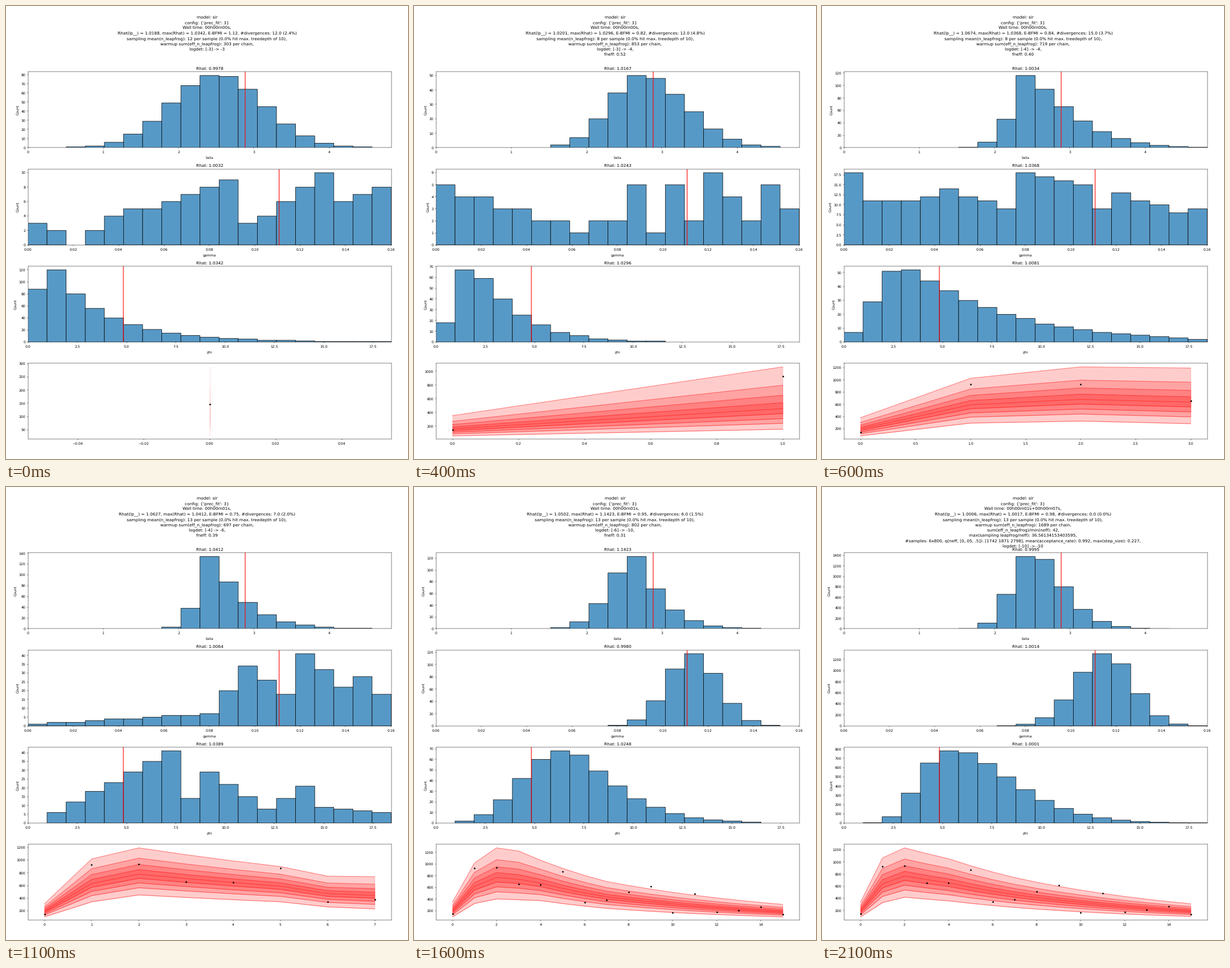
A matplotlib script for the animation above (2600 ms loop, 706 px wide and 794 px high).

```python
import numpy as np
import matplotlib.pyplot as plt
from matplotlib.animation import FuncAnimation

plt.rcParams["text.hinting"] = "no_hinting"

W, H, DPI = 706, 794, 44.125
BINS = np.arange(19)
BLUE = "#5799c6"
# name, axis end, true value
PARAMS = [("beta", 4.824, 2.885), ("gamma", 0.1601, 0.1107), ("phi", 18.42, 4.838)]
OBSERVED = [147, 929, 934, 658, 650, 873, 343, 380,
            516, 615, 166, 487, 175, 210, 265, 136]
# log-scale position of each quantile line between the lowest and the highest
LEVELS = [0, 0.23, 0.36, 0.47, 0.56, 0.65, 0.745, 0.85, 1]


def header(wall, lp, rhat, bfmi, div, leap, warmup, *rest):
    return [
        "model: sir",
        "config: {'prec_fit': 3}",
        f"Wall time: {wall},",
        f"Rhat(lp__) = {lp}, max(Rhat) = {rhat}, E-BFMI = {bfmi}, #divergences: {div}",
        f"sampling mean(n_leapfrog): {leap} per sample (0.0% hit max. treedepth of 10),",
        f"warmup sum(eff_n_leapfrog): {warmup} per chain,",
        *rest]


def bell(peak, mode, left, right, lpow=2, rpow=2):
    """Counts of a skewed bell whose sides fall off as exp(-distance ** power)."""
    d = BINS - mode
    drop = np.where(d < 0, np.abs(d / left) ** lpow, np.abs(d / right) ** rpow)
    y = np.exp(-drop)
    return np.round(peak * y / y.max())


def trace(*points):
    """Counts along a line through (bin, count) points."""
    return np.round(np.interp(BINS, *zip(*points)))


def curve(*points):
    """Exponential growth and decay between (time, value) points."""
    t, v = zip(*points)
    return np.exp(np.interp(np.arange(t[-1] + 1), t, np.log(v)))


# header lines, Rhat values, three histograms, lowest and highest quantile
STAGES = [
    (header("00h00m00s", "1.0188", "1.0342", "1.12", "12.0 (2.4%)", 12, 303,
            "logdet: [-3] -> -3"),
     ("0.9978", "1.0032", "1.0342"),
     (bell(79, 9.4, 3.4, 3.4),
      trace((0, 3), (2, 0), (4, 4), (7, 6), (10, 9), (11, 3), (13, 6),
            (15, 10), (16, 6), (18, 8)),
      bell(120, 1, 1.8, 2.7, 2, 0.9)),
     curve((0, 27.5)), curve((0, 288))),

    (header("00h00m00s", "1.0201", "1.0296", "0.82", "12.0 (4.8%)", 8, 853,
            "logdet: [-3] -> -4,", "fneff: 0.52"),
     ("1.0167", "1.0243", "1.0296"),
     (bell(50, 10.2, 2.3, 3.3),
      trace((0, 5), (7, 1), (9, 2), (10, 5), (11, 1), (12, 5), (13, 2),
            (14, 6), (16, 2), (17, 5), (18, 3)),
      bell(67, 1.3, 1.1, 2.6, 2, 1.2)),
     curve((0, 57), (1, 154)), curve((0, 354), (1, 1067))),

    (header("00h00m00s", "1.0674", "1.0368", "0.84", "15.0 (3.7%)", 8, 719,
            "logdet: [-4] -> -4,", "fneff: 0.40"),
     ("1.0034", "1.0368", "1.0081"),
     (bell(116, 9, 1.06, 3, 1.5, 1.4),
      trace((0, 18), (1, 11), (3, 11), (5, 14), (8, 9), (9, 18), (12, 15),
            (13, 9), (14, 13), (17, 8), (18, 9)),
      bell(52, 2.7, 2.05, 5.4, 2.5, 1.1)),
     curve((0, 85), (1, 294), (2, 327), (3, 285)),
     curve((0, 382), (1, 1028), (2, 1215), (3, 1196))),

    (header("00h00m01s", "1.0627", "1.0412", "0.75", "7.0 (2.0%)", 13, 697,
            "logdet: [-4] -> -6,", "fneff: 0.39"),
     ("1.0412", "1.0064", "1.0389"),
     (bell(134, 9, 0.86, 2, 1.6, 1.2),
      trace((0, 1), (9, 7), (11, 34), (13, 18), (14, 41), (16, 22), (17, 28), (18, 18)),
      trace((0, 0), (7, 41), (8, 14), (9, 29), (12, 8), (14, 21), (15, 9), (18, 6))),
     curve((0, 106), (1, 343), (2, 452), (5, 344), (6, 263), (7, 232)),
     curve((0, 313), (1, 1020), (2, 1195), (5, 900), (6, 749), (7, 740))),

    (header("00h00m01s", "1.0502", "1.1423", "0.95", "6.0 (1.5%)", 13, 802,
            "logdet: [-6] -> -10,", "fneff: 0.31"),
     ("1.1423", "0.9980", "1.0248"),
     (bell(123, 10, 1.95, 1.55, 2, 1.2),
      bell(118, 12.9, 1.85, 1.95),
      bell(68, 6.5, 3.3, 3.3, 2.5, 1.4)),
     curve((0, 98), (1, 325), (2, 403), (4, 375), (7, 242), (15, 97)),
     curve((0, 350), (1, 1017), (2, 1275), (3, 1222), (7, 700), (15, 310))),

    (header("00h00m01s+00h00m07s", "1.0006", "1.0017", "0.98", "0.0 (0.0%)", 13, 1689,
            "sum(eff_n_leapfrog)/min(neff): 42,",
            "max(sampling leapfrog/neff): 36.56134153403595,",
            "#samples: 6x800, q(neff, [0,.05, .5]): [1742 1871 2798], "
            "mean(acceptance_rate): 0.992, max(step_size): 0.227,",
            "logdet: [-10] -> -10"),
     ("0.9995", "1.0014", "1.0001"),
     (bell(1380, 9.5, 1.65, 2.05, 2.3, 1.6),
      bell(1305, 13.2, 2.17, 2),
      bell(780, 5.5, 2.6, 4.1, 3, 1.6)),
     curve((0, 97), (1, 331), (2, 421), (4, 360), (7, 252), (15, 104)),
     curve((0, 336), (1, 1068), (2, 1233), (4, 1054), (7, 744), (15, 313))),
]

fig = plt.figure(figsize=(W / DPI, (H + 0.001) / DPI), dpi=DPI, facecolor="white")
axes = [fig.add_axes([38.5 / W, 1 - (248.5 + 170.3 * k) / H, 638 / W, 133 / H])
        for k in range(4)]
lines = [fig.text(0.5, 1 - (22 + 9.26 * k) / H, "", size=12, ha="center")
         for k in range(10)]


def draw_hist(ax, param, rhat, counts):
    name, end, true = param
    width = end / len(BINS)
    full = counts > 0
    ax.bar(BINS[full] * width, counts[full], width, align="edge",
           facecolor=BLUE, edgecolor="black", linewidth=1.2, snap=False)
    ax.axvline(true, color="red", lw=1.8, snap=False)
    ax.set(xlim=(0, end), ylim=(0, 1.05 * counts.max()), title=f"Rhat: {rhat}")
    ax.set_xlabel(name, labelpad=7)
    ax.set_ylabel("Count")


def draw_fan(ax, low, high):
    x = np.arange(len(low))
    quantiles = [low * (high / low) ** f for f in LEVELS]
    for k in range(4):
        ax.fill_between(x, quantiles[k], quantiles[-1 - k], color="red", alpha=0.2)
    for q in quantiles:
        ax.plot(x, q, color="red", alpha=0.5, lw=1.5)
    ax.plot(x, OBSERVED[:len(x)], "k.", ms=7)


def draw(i):
    # a short first stage, then five longer ones
    text, rhats, hists, low, high = STAGES[(i + 4) // 5]
    for k, line in enumerate(lines):
        line.set_text(text[k] if k < len(text) else "")
    for ax in axes:
        ax.clear()
        ax.tick_params(axis="x", pad=5)
    for ax, param, rhat, counts in zip(axes, PARAMS, rhats, hists):
        draw_hist(ax, param, rhat, counts)
    draw_fan(axes[3], low, high)
    return []


anim = FuncAnimation(fig, draw, frames=26, interval=100, init_func=lambda: draw(0),
                     repeat=True, repeat_delay=0, blit=False)
plt.show()
```
